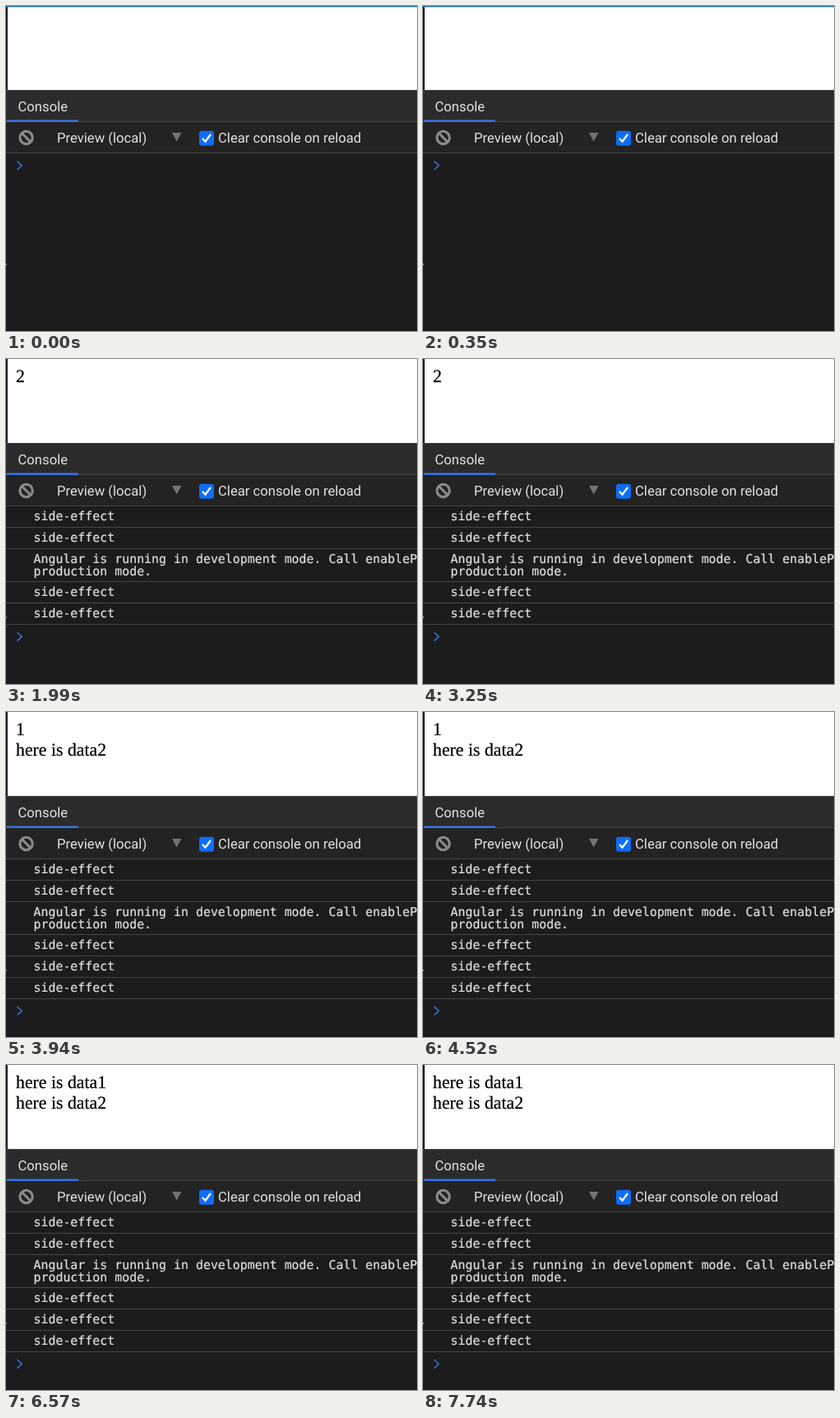
Animation of 500 by 395 pixels, one loop 7810 ms. Source, as an HTML page:

```html
<!DOCTYPE html>
<html lang="en">
<head>
<meta charset="utf-8">
<title>Console</title>
<style>
  html, body { margin: 0; width: 100%; height: 100%; overflow: hidden; background: #1c1c1c; }
  svg { display: block; width: 500px; height: 395px; }
  text { white-space: pre; text-rendering: geometricPrecision; }
  .page { font: 21.8px "Liberation Serif", Times, serif; fill: #000; stroke: #000; stroke-width: .25; }
  .ui { font: 16.66px Roboto, sans-serif; fill: #e2e2e2; }
  .log { font: 14.92px "DejaVu Sans Mono", Menlo, monospace; fill: #e0e0e0; }
  .log text { stroke: #e0e0e0; stroke-width: .2; }
  .rule { stroke: #454545; }
</style>
</head>
<body>
<svg viewBox="0 0 500 395">
  <rect width="500" height="395" fill="#1c1c1c"/>
  <rect x="2" width="498" height="102" fill="#fff"/>
  <rect id="loading" width="500" height="1.3" fill="#1768ae"/>
  <g class="page">
    <text id="first" x="12" y="28.2"/>
    <text id="second" x="12" y="52.8"/>
  </g>

  <rect y="102" width="500" height="38" fill="#2b2b2b"/>
  <rect y="141" width="500" height="37" fill="#232323"/>
  <path class="rule" d="M0 102.5H500M0 140.5H500M0 178.5H500"/>
  <rect x="1" y="138.5" width="87" height="2.5" fill="#3673e6"/>
  <g class="ui">
    <text x="14.5" y="127.6">Console</text>
    <text x="62" y="165.6">Preview (local)</text>
    <text x="258" y="165.6">Clear console on reload</text>
  </g>
  <g fill="none" stroke="#8b8b8b" stroke-width="3.1">
    <circle cx="24.6" cy="160" r="7.7"/>
    <path d="M19.3 154.5L30.1 165.5"/>
  </g>
  <path d="M202 154H213.5L207.7 164.5Z" fill="#737373"/>
  <rect x="235" y="151.7" width="18" height="18" rx="3" fill="#0f6df5"/>
  <path d="M239 161L242.5 164.8L249 156" fill="none" stroke="#fff" stroke-width="2.3"/>

  <g id="logs" class="log"></g>
  <path id="prompt" d="M13.6 -5.2L19.2 0L13.6 5.2" fill="none" stroke="#3673e6" stroke-width="1.5"/>
  <rect y="313" width="1" height="2" fill="#999"/>
</svg>
<script>
  const LOOP = 7810, LINE = 14.6;
  const effect = ["side-effect"];
  const notice = ["Angular is running in development mode. Call enableP", "production mode."];
  const entries = [effect, effect, notice, effect, effect, effect];
  const states = [
    { at: 0, logs: 0, lines: ["", ""] },
    { at: 440, logs: 3, lines: ["", ""] },
    { at: 1850, logs: 5, lines: ["2", ""] },
    { at: 3850, logs: 6, lines: ["1", "here is data2"] },
    { at: 5850, logs: 6, lines: ["here is data1", "here is data2"] }
  ];
  const $ = id => document.getElementById(id);
  let shown;

  function render(state) {
    let top = 178.7, markup = "";
    for (const entry of entries.slice(0, state.logs)) {
      entry.forEach((line, i) => {
        markup += `<text x="33.5" y="${top + 17.7 + i * LINE}">${line}</text>`;
      });
      top += 25.8 + (entry.length - 1) * LINE;
      markup += `<path class="rule" d="M0 ${Math.floor(top) + 0.5}H500"/>`;
    }
    $("logs").innerHTML = markup;
    $("prompt").setAttribute("transform", `translate(0 ${top + 15.1})`);
    $("first").textContent = state.lines[0];
    $("second").textContent = state.lines[1];
    $("loading").style.display = state.logs ? "none" : "";
  }

  function tick() {
    const time = performance.now() % LOOP;
    const state = states.filter(s => s.at <= time).pop();
    if (state !== shown) render(shown = state);
    requestAnimationFrame(tick);
  }
  tick();
</script>
</body>
</html>
```
